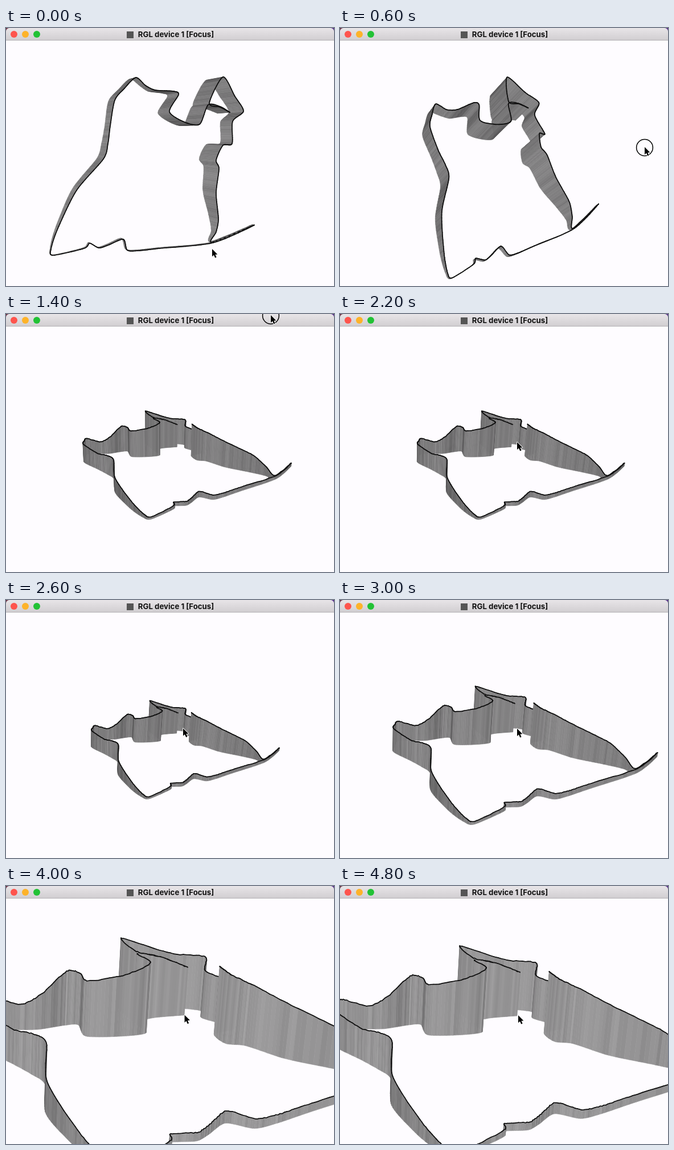
An HTML page with a canvas for the animation above (5 s loop, 576 by 453 pixels).

```html
<!DOCTYPE html>
<html lang="en">
<head>
<meta charset="utf-8">
<title>RGL device</title>
<style>
  html, body { margin: 0; width: 100%; height: 100%; overflow: hidden; background: #fefcff; }
  canvas { display: block; }
</style>
</head>
<body>
<canvas id="stage" width="576" height="453"></canvas>
<script>
const ctx = document.getElementById('stage').getContext('2d');
const CX = 289.5, CY = 239, SUB = 12, STEP = 200, STEPS = 25;

// Key points of the closed route: x and y seen from above, and height.
const route = [
  [436, 346, 6], [364, 377, 6], [270, 387, 7], [233, 391, 7], [213, 390, 8], [206, 371, 10],
  [180, 381, 8], [163, 386, 7], [147, 378, 7], [137, 387, 6], [83, 399, 4], [79, 388, 7],
  [91, 352, 15], [124, 285, 27], [171, 230, 34], [179, 203, 33], [183, 172, 28], [191, 127, 32],
  [208, 106, 30], [228, 87, 27], [245, 101, 21], [262, 109, 28], [294, 111, 44], [303, 117, 42],
  [287, 147, 45], [313, 165, 50], [340, 169, 57], [355, 135, 55], [376, 138, 49], [393, 148, 39],
  [376, 139, 49], [357, 132, 56], [381, 86, 54], [402, 120, 44], [417, 146, 44], [398, 164, 38],
  [397, 203, 38], [381, 206, 55], [369, 232, 56], [374, 247, 50], [369, 290, 44], [373, 335, 31],
  [369, 358, 16], [362, 376, 6]];

const noise = i => { const v = Math.sin(i * 12.9898) * 43758.5453; return v - Math.floor(v); };
const lerp = (a, b, t) => a.map((v, i) => v + (b[i] - v) * t);

// Values at a step, interpolated between [step, ...values] keys.
function keyed(keys, step) {
  const next = keys.findIndex(k => k[0] > step);
  if (next < 0) return keys[keys.length - 1].slice(1);
  if (next === 0) return keys[0].slice(1);
  const a = keys[next - 1], b = keys[next];
  return lerp(a, b, (step - a[0]) / (b[0] - a[0])).slice(1);
}

// Closed smooth curve through the key points.
function smooth(points) {
  const n = points.length;
  return points.flatMap((b, i) => Array.from({ length: SUB }, (_, k) => {
    const a = points[(i + n - 1) % n], c = points[(i + 1) % n], d = points[(i + 2) % n];
    const t = k / SUB, t2 = t * t, t3 = t2 * t;
    return b.map((v, j) => v * (2 * t3 - 3 * t2 + 1) + c[j] * (3 * t2 - 2 * t3)
      + 0.4 * (c[j] - a[j]) * (t3 - 2 * t2 + t) + 0.4 * (d[j] - v) * (t3 - t2));
  }));
}

// The view from above: rows of [topX, topY, baseX, baseY], relative to the centre.
const line = smooth(route).map(([x, y, h], i) => [x - CX, y - CY, h + 0.8 * (noise(i + 300) - 0.5)]);
const above = {
  rows: line.map(([x, y, h]) => [x, y, x - h * (0.45 + x / 1000), y - h * (0.05 + y / 1000)]),
  facing: [-1, 0.1]
};

// Another view: a projective map of the ground, with walls rising along lift per unit of height.
function view([a, b, c, d, e, f, g, k], lift, facing) {
  const rows = above.rows.map(([, , x, y], i) => {
    const w = 1 + g * x + k * y, u = (a * x + b * y + c) / w, v = (d * x + e * y + f) / w;
    const [dx, dy] = lift(u, v), h = line[i][2];
    return [u + h * dx, v + h * dy, u, v];
  });
  return { rows, facing };
}
const turned = view([0.8, 0.475, -4.3, -0.24, 0.84, 17.6, 0, 0],
  (u, v) => [0.55 + u / 1000, -0.49 + v / 1300], [-0.75, 0.65]);
const low = view([0.8, 0.745, 12.7, -0.175, 0.23, 28.7, 0.00033, -0.00058],
  u => [0.07 + u / 2500, -1], [0, 1]);
const views = [above, turned, low, low];

const turnKeys = [[1, 0], [2, 0.35], [3, 1], [4, 1.38], [7, 2]];
const yawKeys = [[3, 0], [7, 0.06], [8, 0]];
const wheelKeys = [[11, 0], [13, -2], [14, 1], [15, 5], [16, 10], [17, 13.7], [18, 13.7],
  [20, 15.7], [21, 15.7], [23, 13.7]];
const pointerKeys = [[0, 362, 388], [1, 390, 398], [3, 535, 209], [4, 511, 100], [7, 465, 2],
  [8, 466, 2], [9, 372, 143], [10, 313, 223], [11, 311, 225], [16, 311, 226], [17, 314, 226],
  [24, 313, 227]];

function path(points) {
  ctx.beginPath();
  points.forEach(([x, y]) => ctx.lineTo(x, y));
}

function drawWall(step) {
  const [turn] = keyed(turnKeys, step), [yaw] = keyed(yawKeys, step);
  const zoom = 1.05 ** keyed(wheelKeys, step)[0];
  const from = views[Math.floor(turn)], to = views[Math.floor(turn) + 1], t = turn % 1;
  const facing = lerp(from.facing, to.facing, t);
  const place = (x, y) => [CX + (x + yaw * y) * zoom, CY + y * zoom];
  const pts = from.rows.map((row, i) => {
    const [x, y, bx, by] = lerp(row, to.rows[i], t);
    return [...place(x, y), ...place(bx, by)];
  });
  const quads = pts.map((p, i) => {
    const q = pts[(i + 1) % pts.length];
    return { p, q, i, depth: (p[2] + q[2]) * facing[0] + (p[3] + q[3]) * facing[1] };
  }).sort((a, b) => a.depth - b.depth);

  ctx.lineCap = ctx.lineJoin = 'round';
  for (const { p, q, i } of quads) {
    const sx = q[0] - p[0], sy = q[1] - p[1], ox = p[2] - p[0], oy = p[3] - p[1];
    const face = Math.abs(sx * oy - sy * ox) / (Math.hypot(sx, sy) * Math.hypot(ox, oy) + 0.01);
    const grain = 14 * (noise(i) - 0.5) + 10 * (noise(Math.floor(i / 3) + 900) - 0.5);
    const g = Math.round(68 + 60 * face + 25 * Math.min(1, Math.max(0, zoom - 1)) + grain);
    ctx.fillStyle = ctx.strokeStyle = `rgb(${g},${g - 1},${g})`;
    ctx.lineWidth = 0.6;
    path([[p[0], p[1]], [q[0], q[1]], [q[2], q[3]], [p[2], p[3]]]);
    ctx.closePath();
    ctx.fill();
    ctx.stroke();
    ctx.strokeStyle = '#0c0c0c';
    ctx.lineWidth = 1.7;
    path([p, q]);
    ctx.stroke();
  }
}

function drawTitle() {
  ctx.fillStyle = '#6b3448';
  ctx.fillRect(0, 0, 20, 10);
  ctx.fillStyle = '#57308a';
  ctx.fillRect(556, 0, 20, 10);
  const shade = ctx.createLinearGradient(0, 0, 0, 22);
  shade.addColorStop(0, '#e8e5e8');
  shade.addColorStop(1, '#d0cdd0');
  ctx.fillStyle = shade;
  ctx.beginPath();
  ctx.roundRect(0, 0, 576, 22, [6, 6, 0, 0]);
  ctx.fill();
  ctx.fillStyle = '#b4b2b4';
  ctx.fillRect(0, 21, 576, 1);
  ['#fe544d', '#fdb32a', '#22c235'].forEach((color, i) => {
    ctx.fillStyle = color;
    ctx.beginPath();
    ctx.arc(14 + 20 * i, 11, 6, 0, 7);
    ctx.fill();
  });
  ctx.fillStyle = '#555';
  ctx.fillRect(212, 6, 12, 12);
  ctx.fillStyle = '#111';
  ctx.font = '700 13.25px Inter, "Liberation Sans", sans-serif';
  ctx.textAlign = 'center';
  ctx.fillText('RGL device 1 [Focus]', 298.5, 16);
}

function drawPointer([x, y], pressed) {
  ctx.save();
  ctx.translate(x, y);
  if (pressed) {
    ctx.strokeStyle = '#000';
    ctx.lineWidth = 1.5;
    ctx.beginPath();
    ctx.arc(0, 1, 14.4, 0, 7);
    ctx.stroke();
  }
  path([[0, 0], [0, 13.2], [3, 10.5], [5.2, 15.6], [7.6, 14.6], [5.4, 9.7], [9.4, 9.4]]);
  ctx.closePath();
  ctx.lineWidth = 1.6;
  ctx.strokeStyle = '#fff';
  ctx.stroke();
  ctx.fillStyle = '#000';
  ctx.fill();
  ctx.restore();
}

function draw(step) {
  ctx.fillStyle = '#fefcff';
  ctx.fillRect(0, 0, 576, 453);
  drawWall(step);
  drawTitle();
  drawPointer(keyed(pointerKeys, step), step >= 2 && step <= 8);
}

let start, shown = 0;
function tick(now) {
  start ??= now;
  const step = Math.floor((now - start) / STEP) % STEPS;
  if (step !== shown) draw(shown = step);
  requestAnimationFrame(tick);
}
draw(0);
requestAnimationFrame(tick);
</script>
</body>
</html>
```
